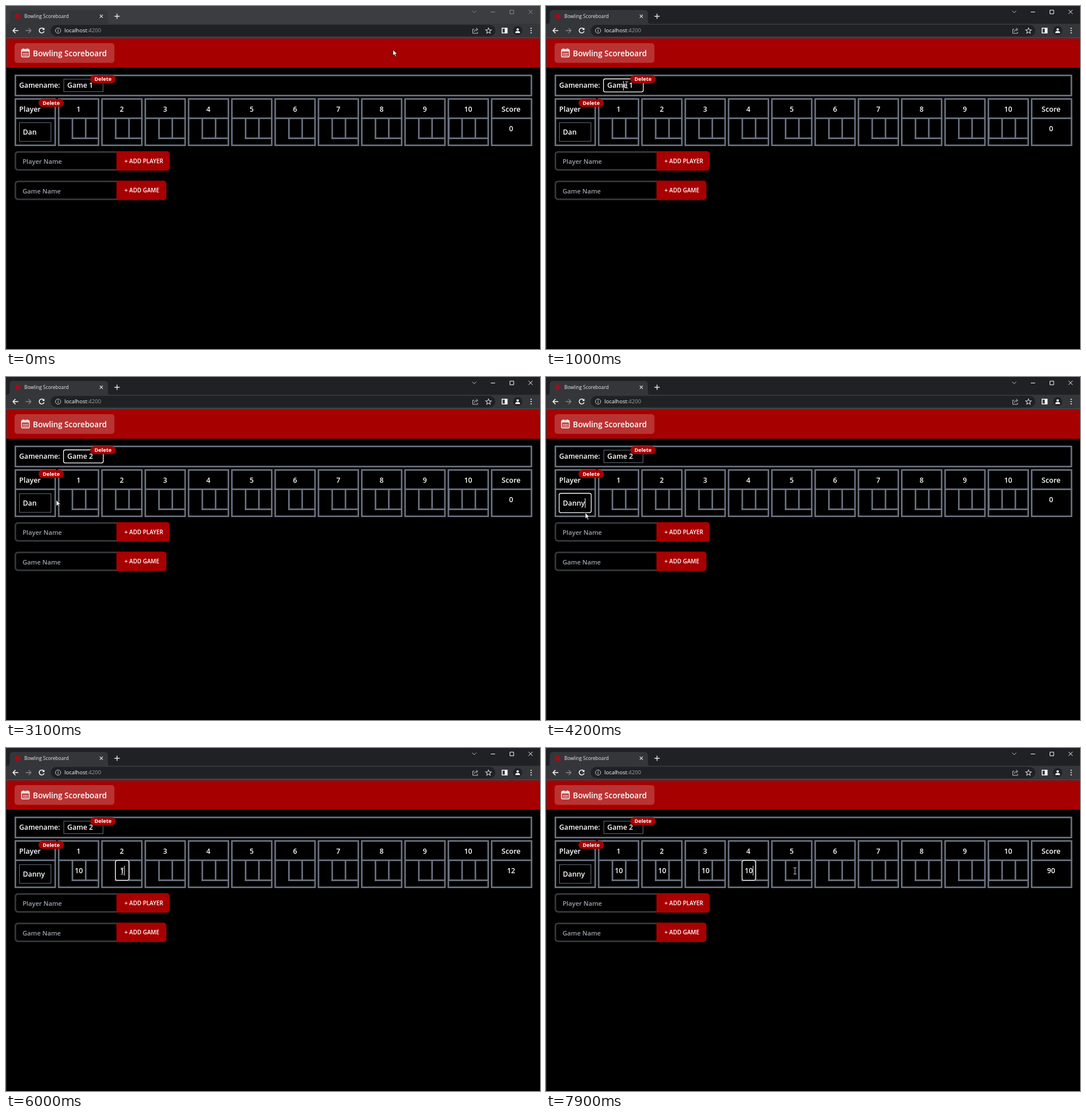
Recreate the animation shown at these times as an HTML page. Size 933 by 600 pixels, loop 8000 ms.

```html
<!DOCTYPE html>
<html lang="en">
<head>
<meta charset="utf-8">
<title>Bowling Scoreboard</title>
<style>
  html, body { margin: 0; width: 100%; height: 100%; overflow: hidden; background: #000; }
  svg { display: block; width: 933px; height: 600px; }
  text { font-family: "Open Sans", "Noto Sans", sans-serif; font-weight: 600; fill: #fff; white-space: pre; }
</style>
</head>
<body>
<svg id="stage" viewBox="0 0 933 600"><g id="page"></g><g id="live"></g></svg>
<script>
const LOOP = 8000, STEP = 100;
const RED = '#a70000', GRAY = '#6b7280', BAR = '#35363a', DARK = '#202124', PALE = '#e8eaed';
const SIZE = 12.3;
const page = document.getElementById('page');
const live = document.getElementById('live');

const rect = (x, y, w, h, fill, rx = 0, stroke = 'none', sw = 1) =>
  `<rect x="${x}" y="${y}" width="${w}" height="${h}" fill="${fill}" rx="${rx}" stroke="${stroke}" stroke-width="${sw}"/>`;
const path = (d, stroke, sw = 1, fill = 'none') =>
  `<path d="${d}" stroke="${stroke}" stroke-width="${sw}" fill="${fill}"/>`;
const circle = (x, y, r, fill, stroke = 'none', sw = 1) =>
  `<circle cx="${x}" cy="${y}" r="${r}" fill="${fill}" stroke="${stroke}" stroke-width="${sw}"/>`;
const text = (x, y, s, size = SIZE, extra = '') =>
  `<text x="${x}" y="${y}" font-size="${size}" ${extra}>${s}</text>`;
const centered = (x, y, s, size, extra = '') => text(x, y, s, size, 'text-anchor="middle" ' + extra);

const pen = document.createElement('canvas').getContext('2d');
const textWidth = s => {
  pen.font = `600 ${SIZE}px "Open Sans", "Noto Sans", sans-serif`;
  return pen.measureText(s).width;
};

const cellLeft = i => 15 + 75.65 * i;
const rollCenter = i => cellLeft(i + 1) + 36.7;

function browser(active) {
  const ctl = active ? '#fff' : '#8b8d90';
  return rect(0, 0, 933, 32, active ? DARK : '#3c3d40') +
    path('M2 31.5Q6.5 31.5 6.5 26V13Q6.5 7 12.5 7H172Q178 7 178 13V26Q178 31.5 183 31.5Z', 'none', 0, BAR) +
    rect(0, 31, 933, 25, BAR) +
    circle(20.5, 18, 5, '#9c1018') +
    text(32, 21, 'Bowling Scoreboard', 8.35, 'style="font-weight:400;fill:#e8eaed"') +
    path('M163.8 15.2l5.4 5.4m0-5.4l-5.4 5.4', PALE, 1.1) +
    path('M189.5 18h9M194 13.5v9', PALE, 1.4) +
    path('M814.5 8.3l3.5 3.5 3.5-3.5', active ? '#c4c5c7' : '#8b8d90') +
    path('M847 10.5h7.5M880.5 7.2h6.5v6.5h-6.5zM913 6.7l7 7m0-7l-7 7', ctl) +
    path('M21.5 43H12.5M16.5 38.6L12.2 43l4.3 4.4', '#fff', 1.5) +
    path('M34.5 43H43.5M39.5 38.6L43.8 43l-4.3 4.4', '#85878a', 1.3) +
    path('M66 40.2A4.4 4.4 0 1 0 66.6 44.2', '#fff', 1.5) +
    path('M67.2 38v4h-4z', 'none', 0, '#fff') +
    rect(78, 33, 777, 20, DARK, 10) +
    circle(91, 43, 4.6, 'none', '#c4c6c9') +
    path('M91 42.2v3.3M91 40.1v1.2', '#c4c6c9', 1.2) +
    text(102, 46.4, 'localhost<tspan fill="#9aa0a6">:4200</tspan>', 9.5, 'style="font-weight:400"') +
    path('M818 40.5h-2.5v7.3h8.5v-2.5M818 45q.6-4 5-4M821.3 38.3l3 2.7-3 2.7', '#c4c6c9') +
    path('M843 38.4l1.4 3.2 3.5.3-2.7 2.3.8 3.4-3-1.8-3 1.8.8-3.4-2.7-2.3 3.5-.3z', '#d5d7da', 1.1) +
    rect(866.8, 38.8, 8.8, 8.4, 'none', 0, '#fff', 1.4) + rect(871.5, 39, 4.5, 8, '#fff') +
    circle(894, 43, 8, DARK) + circle(894, 41, 2.1, '#fff') +
    path('M889.8 47.2q0-3.4 4.2-3.4t4.2 3.4z', 'none', 0, '#fff') +
    [39, 43, 47].map(y => circle(917.5, y, 1.1, '#fff')).join('') +
    rect(0, 55, 933, 1.6, '#4c4d50');
}

function deletePill(x, y) {
  return rect(x, y, 44.5, 14, RED, 7) + centered(x + 22.2, y + 10.4, 'Delete', 9.2, 'style="font-weight:700"');
}

function addRow(y, hint, label, width) {
  return path(`M194 ${y + 1.4}H21.4q-5 0-5 5v${21.2}q0 5 5 5H194`, '#38393d', 2.7) +
    text(29, y + 22, hint, 11.15, 'style="fill:#9ca3af"') +
    rect(193, y, width, 34, RED, 5) + rect(193, y, 8, 34, RED) +
    text(207, y + 20.6, label, 10);
}

function scoreCell(i) {
  const x = cellLeft(i);
  let out = rect(x + 1.4, 162.6, 69.6, 81.1, 'none', 0, GRAY, 2.7) +
    path(`M${x} 196.3h72.3`, GRAY, 2.7);
  if (i === 11) return out + centered(x + 35.3, 184.6, 'Score', 12.6);
  if (!i) return out;
  const lines = i === 10 ? [2.2, 25.4, 48.6] : [25.4, 48.6];
  return out + centered(x + 36, 184.6, i, SIZE) +
    lines.map(d => path(`M${x + d} 196V232.6`, GRAY, 2.7)).join('') +
    path(`M${x + lines[0] - 1.3} 231.3H${x + 71}`, GRAY, 2.7);
}

function staticPage() {
  let out = rect(0, 56.6, 933, 51.4, RED) + rect(15, 65, 174.5, 34.5, '#b93333', 5) +
    rect(27.2, 76, 13.4, 13, 'none', 1.5, '#fff', 1.4) +
    path('M27 78.4h14M30.5 74.6v2M37.3 74.6v2', '#fff', 2.2);
  for (let n = 0; n < 8; n++) out += rect(29.6 + n % 4 * 2.4, 82 + (n >> 2) * 3, 1.5, 1.7, '#fff');
  out += text(47, 87.6, 'Bowling Scoreboard', 13.5) +
    rect(16.4, 121.4, 901.6, 35.3, 'none', 0, GRAY, 2.7) +
    text(23, 143, 'Gamename:', 12.2);
  for (let i = 0; i < 12; i++) out += scoreCell(i);
  return out + text(23, 184.6, 'Player', 12.5) +
    addRow(254, 'Player Name', '+ ADD PLAYER', 93) +
    addRow(305.5, 'Game Name', '+ ADD GAME', 87.3) +
    rect(0, 56, 1, 544, '#2c2d30');
}

// time, field, its text, and caret index or score
const steps = [
  [1000, 'game', 'Game 1', 3], [1500, 'game', 'Game 1', 5], [2500, 'game', 'Game 2'],
  [3300, 'name', 'Dan'], [3600, 'name', 'Dann'], [3900, 'name', 'Danny'],
  [4800, 0, ''], [5400, 0, '1', 1], [5500, 0, '10', 10],
  [5900, 1, ''], [6000, 1, '1', 12], [6100, 1, '10', 30],
  [6700, 2, ''], [7000, 2, '1', 33], [7100, 2, '10', 60],
  [7500, 3, ''], [7600, 3, '1', 63], [7700, 3, '10', 90]
];

// time, x, y of the pointer
const route = [
  [0, 676, 76], [900, 143, 138], [1000, 141, 138], [1500, 147, 139], [1700, 147, 139],
  [2000, 156, 141], [2400, 181, 179], [2600, 184, 182], [3300, 64, 223], [3500, 64, 223],
  [3700, 65, 231], [3800, 65, 231], [4200, 68.5, 237], [4300, 68.5, 237], [4800, 128, 215],
  [5000, 128, 215], [5300, 199, 213], [5900, 203, 215], [6100, 203, 216], [6500, 280, 216],
  [7100, 280, 216], [7400, 355, 215], [7500, 355, 215], [7900, 435, 215], [8000, 435, 215]
];

function pointerAt(t) {
  const i = route.findIndex(k => k[0] > t);
  const [t0, x0, y0] = route[i - 1], [t1, x1, y1] = route[i];
  const u = (t - t0) / (t1 - t0), e = u * u * (3 - 2 * u);
  return [x0 + (x1 - x0) * e, y0 + (y1 - y0) * e];
}

function overField(x, y) {
  const inside = (l, t, r, b) => x > l && x < r && y > t && y < b;
  if (inside(101, 128, 169, 150) || inside(23, 204, 79, 236.5)) return true;
  for (let i = 1; i < 11; i++) {
    const left = cellLeft(i);
    if (inside(left + (i === 10 ? 2 : 25), 197, left + 70, 231)) return true;
  }
  return false;
}

function pointer(t) {
  const [x, y] = pointerAt(t);
  const shape = overField(x, y)
    ? path('M-2.5-5.5h2l.5.5.5-.5h2M0-5V5M-2.5 5.5h2l.5-.5.5.5h2', '#d8d8d8')
    : path('M0 .5V11l2.5-2.3 1.8 4 1.8-.8-1.8-3.9h3.5z', '#000', .8, '#fff');
  return `<g transform="translate(${x} ${y})">${shape}</g>`;
}

function draw(t) {
  const values = { game: 'Game 1', name: 'Dan' };
  let score = 0, now = null;
  for (const s of steps) {
    if (s[0] > t) break;
    now = s;
    values[s[1]] = s[2];
    if (s[1] < 4 && s[3]) score = s[3];
  }
  const focus = now && now[1];
  const selecting = t >= 1800 && t < 2500;
  const field = (x, y, w, h, on) => on
    ? rect(x - .5, y - .5, w + 1, h + 1, '#000', 3, '#fff', 1.3)
    : rect(x, y, w, h, '#000', 0, GRAY, 1);

  let out = browser(t >= 1000) +
    field(101, 128, 68.5, 21.8, focus === 'game') +
    field(23.5, 204, 55, 32.8, focus === 'name');
  if (selecting) {
    const start = 107 + textWidth('Game ');
    out += rect(start, 131, textWidth('1'), 17, '#0a60d8');
  }
  out += text(107, 143.4, values.game) + text(29.5, 225, values.name);
  for (let i = 0; i < 4; i++) {
    if (focus === i) out += rect(cellLeft(i + 1) + 25, 196.6, 23.4, 34.8, '#000', 3.5, '#fff', 1.2);
    if (values[i]) out += centered(rollCenter(i), 218.6, values[i], SIZE);
  }
  out += centered(882.5, 218.6, score, SIZE) + deletePill(147.3, 121) + deletePill(56.7, 162.6);

  if (now && !selecting && (t - now[0]) % 1000 < 500) {
    const [, f, s, index] = now;
    const before = textWidth(f === 'game' ? s.slice(0, index) : s);
    const x = f === 'game' ? 107 + before : f === 'name' ? 29.5 + before : rollCenter(f) + before / 2;
    const y = f === 'game' ? 131 : f === 'name' ? 212 : 206;
    out += rect(x, y, 1, 17, '#fff');
  }
  live.innerHTML = out + pointer(t);
}

page.innerHTML = staticPage();
const begin = performance.now();
let last = -1;
function tick() {
  const t = Math.floor((performance.now() - begin) % LOOP / STEP) * STEP;
  if (t !== last) draw(last = t);
  requestAnimationFrame(tick);
}
tick();
</script>
</body>
</html>
```
